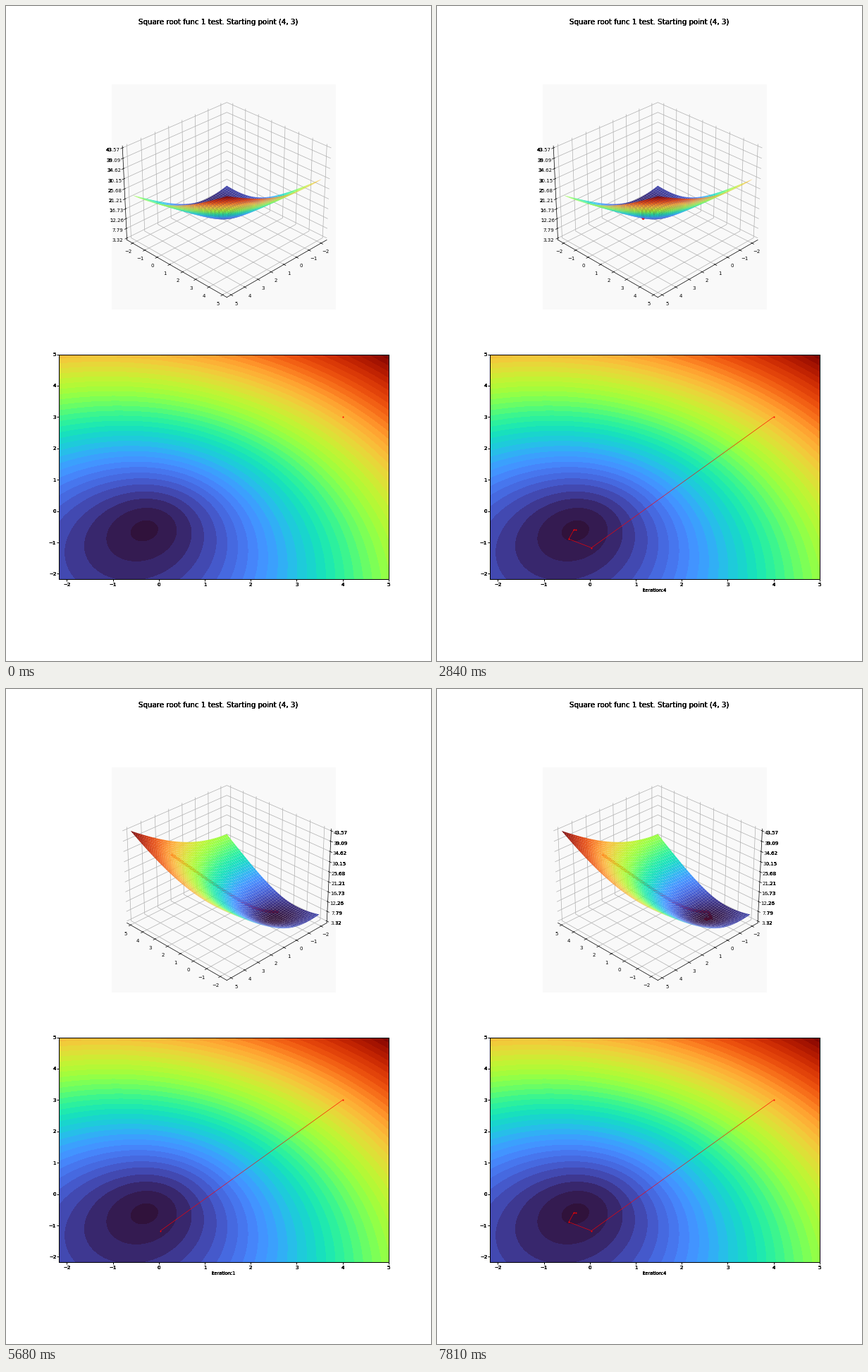
Write a matplotlib script that moves like this. It is 603 by 928 pixels and loops after 8 s.

```python
import numpy as np
import matplotlib.pyplot as plt
from matplotlib.animation import FuncAnimation
from matplotlib.transforms import Bbox

W, H, DPI = 603, 928, 64
LOOP, FRAMES, STEP = 8000, 64, 710
STEPS_PER_VIEW = 7
AZIMUTHS = (45, 135)

plt.rcParams["font.family"] = "DejaVu Sans"


def px(n):
    """Pixels to points."""
    return n * 72 / DPI


def f(x, y):
    return x + 2 * y + 4 * np.sqrt(1 + x**2 + y**2)


def grad(p):
    return np.array([1, 2]) + 4 * p / np.sqrt(1 + p @ p)


def line_search(p, d):
    a, b = 0.0, 5.0
    for _ in range(80):
        m, n = a + (b - a) / 3, b - (b - a) / 3
        if f(*(p + m * d)) < f(*(p + n * d)):
            b = n
        else:
            a = m
    return (a + b) / 2


def conjugate_gradient(p, count):
    """Polak-Ribiere descent with an exact line search."""
    path = [p]
    g = grad(p)
    d = -g
    for _ in range(count):
        p = p + line_search(p, d) * d
        new = grad(p)
        d = -new + new @ (new - g) / max(g @ g, 1e-30) * d
        g = new
        path.append(p)
    return np.array(path)


def label(x, y, s, size, ha="center", copies=4):
    """Text stacked on itself, which thickens its smooth edges."""
    return [fig.text(x / W, 1 - y / H, s, size=px(size), ha=ha, va="baseline")
            for _ in range(copies)]


def widened(a, b):
    return a - (b - a) / 48, b + (b - a) / 48


path = conjugate_gradient(np.array([4.0, 3.0]), STEPS_PER_VIEW - 1)
lo, hi = path.min() - 1, path.max() + 1
z_lo, z_hi = np.sqrt(11), f(hi, hi)
ticks = range(-2, 6)

fig = plt.figure(figsize=(W / DPI, H / DPI), dpi=DPI, facecolor="white")
fig.subplots_adjust(left=0.125, right=0.9, bottom=0.125, top=0.88, hspace=0.2)
label(301.5, 26.5, "Square root func 1 test. Starting point (4, 3)", 10.25)

# Surface
ax3 = fig.add_subplot(211, projection="3d", facecolor="#f9f9f9")
gx, gy = np.meshgrid(*[np.linspace(lo, hi, 50)] * 2)
ax3.plot_surface(gx, gy, f(gx, gy), cmap="turbo")
trail3, = ax3.plot([], [], [], color="red", lw=px(4))

side = widened(*widened(lo, hi))
ax3.set_xlim(*side)
ax3.set_ylim(*side)
ax3.set_zlim(*widened(z_lo, z_hi))
z_ticks = np.linspace(z_lo, z_hi, 10)
ax3.set_xticks(ticks)
ax3.set_yticks(ticks)
ax3.set_zticks(z_ticks, [f"{z:.2f}" for z in z_ticks])
ax3.tick_params(labelsize=px(7), pad=0.5)
for axis in (ax3.xaxis, ax3.yaxis, ax3.zaxis):
    axis.set_pane_color((1, 1, 1, 0))

# Contour map
ax2 = fig.add_subplot(212)
cx, cy = np.meshgrid(*[np.linspace(lo, hi, 220)] * 2)
levels = [z_lo - 0.01, 3.46, 4.13, 5.0, 5.87, 6.85, *np.arange(7.75, 44, 0.9)]
ax2.contourf(cx, cy, f(cx, cy), levels, cmap="turbo", vmin=z_lo, vmax=z_hi)
trail2, = ax2.plot([], [], color="red", lw=px(0.6), marker="o",
                   ms=px(2), mew=0)
ax2.set(xlim=(lo, hi), ylim=(lo, hi), xticks=ticks, yticks=ticks)
ax2.tick_params(length=px(3), width=px(1), labelbottom=False, labelleft=False)
for spine in ax2.spines.values():
    spine.set_linewidth(px(1))
for t in ticks:
    s = str(t).replace("-", "\u2212")
    x, y = ax2.transData.transform((t, t))
    label(x, 822, s, 7)
    label(71, H - y + 2.5, s, 7, ha="right")
counter = label(309, 830.5, "", 6.5)


def thicken_outside(azim):
    """Extra copies of the z labels, clipped to the part beside the box."""
    ax3.view_init(30, azim)
    fig.canvas.draw()
    copies = []
    for clip in (Bbox.from_extents(0, 0, ax3.bbox.x0, H),
                 Bbox.from_extents(ax3.bbox.x1, 0, W, H)):
        for tick in ax3.zaxis.get_major_ticks():
            src = tick.label1
            x, y = src.get_transform().transform(src.get_position())
            for _ in range(3):
                t = fig.text(x / W, y / H, src.get_text(), size=px(7),
                             ha=src.get_ha(), va=src.get_va(), visible=False)
                t.set_clip_on(True)
                t.set_clip_box(clip)
                copies.append(t)
    return copies


edge_labels = [thicken_outside(a) for a in AZIMUTHS]


def on_surface(points):
    """Dense walk along the straight segments, lifted onto the surface."""
    if len(points) < 2:
        x, y = points.T
    else:
        s = np.linspace(0, len(points) - 1, 40 * (len(points) - 1) + 1)
        x, y = (np.interp(s, range(len(points)), c) for c in points.T)
    return x, y, f(x, y)


def update(i):
    interval = LOOP // FRAMES
    step = ((i + 1) * interval - 1) // STEP
    view, it = divmod(step, STEPS_PER_VIEW)
    points = path[:it + 1]
    ax3.view_init(30, AZIMUTHS[view])
    trail3.set_data_3d(*on_surface(points))
    trail2.set_data(*points.T)
    for t in counter:
        t.set_text(f"Iteration:{it}" if it else "")
    for k, group in enumerate(edge_labels):
        for t in group:
            t.set_visible(k == view)
    return []


anim = FuncAnimation(fig, update, frames=FRAMES, interval=LOOP // FRAMES,
                     repeat=True, repeat_delay=0, blit=False)
plt.show()
```
